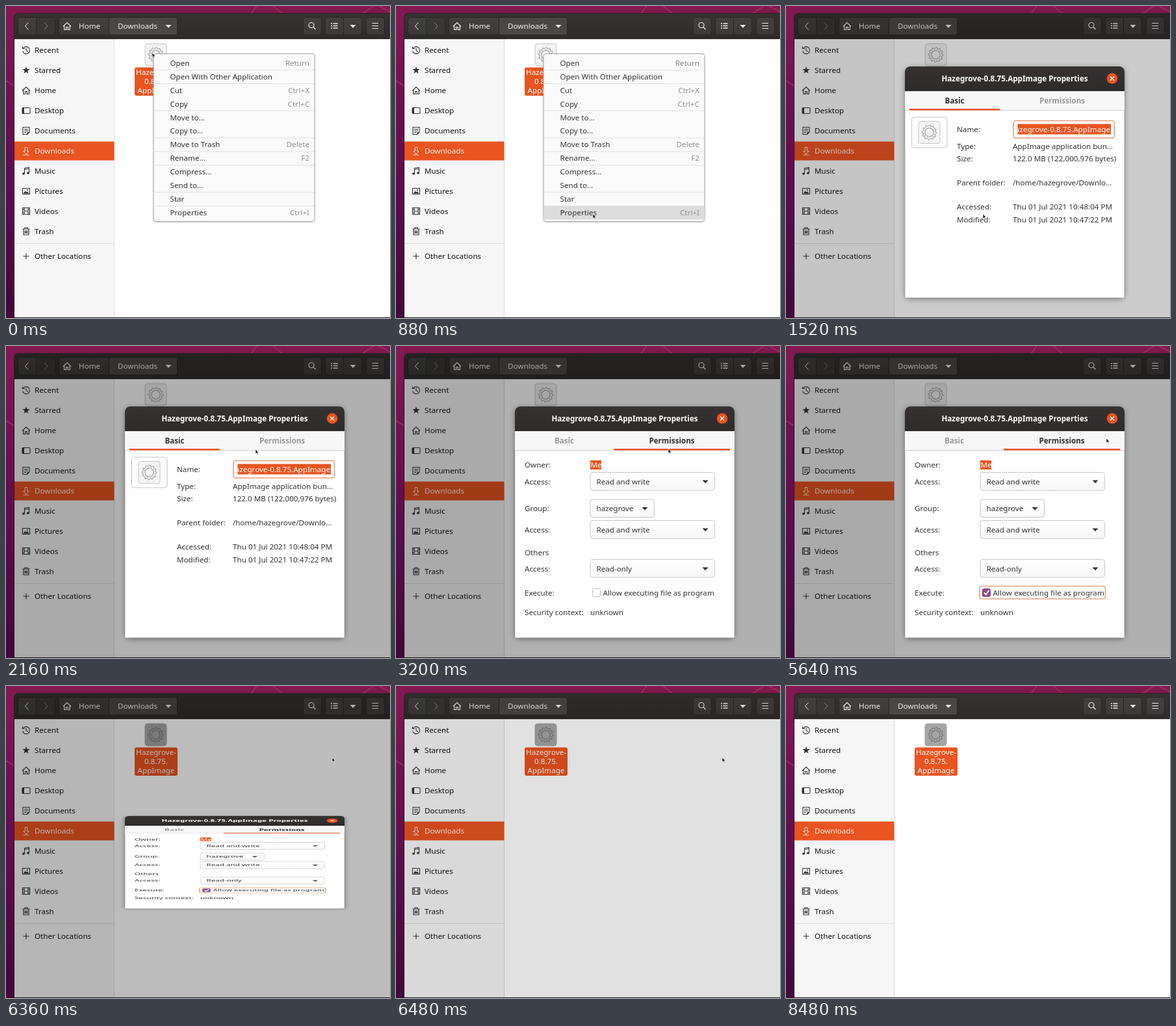
Write an HTML page that moves like this. It is 591 px wide and 480 px high and loops after 8520 ms.

```html
<!DOCTYPE html>
<html lang="en">
<head>
<meta charset="utf-8">
<title>Make a file executable</title>
<style>
  html, body { margin: 0; width: 100%; height: 100%; overflow: hidden; background: #43063a; }
  svg { display: block; width: 591px; height: 480px; }
  text { font: 11.65px "Noto Sans", "Open Sans", sans-serif; white-space: pre; }
  .b { font-weight: 700; }
</style>
</head>
<body>
<svg id="stage" viewBox="0 0 591 480"></svg>
<script>
const LOOP = 8520, STEP = 40, ORANGE = '#e95420', INK = '#333';
const FILE = 'Hazegrove-0.8.75.AppImage';

// y is the middle of the capitals
const text = (x, y, s, fill = INK, anchor = 'start', cls = '') =>
  `<text x="${x}" y="${y + 4.3}" fill="${fill}" text-anchor="${anchor}" class="${cls}">${s}</text>`;
const rect = (x, y, x2, y2, fill, r = 0, more = '') =>
  `<rect x="${x}" y="${y}" width="${x2 - x}" height="${y2 - y}" rx="${r}" fill="${fill}" ${more}/>`;
const line = (d, stroke = INK, w = 1.1, fill = 'none') =>
  `<path d="${d}" stroke="${stroke}" stroke-width="${w}" fill="${fill}"/>`;
const solid = (d, fill = INK) => `<path d="${d}" fill="${fill}"/>`;
const group = (id, body, more = '') => `<g id="${id}" ${more}>${body}</g>`;
const at = (x, y, body) => `<g transform="translate(${x} ${y})">${body}</g>`;
const arrow = (x, y, fill) => solid(`M${x - 4.5} ${y - 2}h9l-4.5 4.8z`, fill);

function ring(n, radius) {
  let d = '';
  for (let i = 0; i < n; i++) {
    const a = i * 2 * Math.PI / n, r = radius(i);
    d += `${i ? 'L' : 'M'}${(r * Math.sin(a)).toFixed(2)} ${(-r * Math.cos(a)).toFixed(2)}`;
  }
  return d + 'z';
}
const gear = ring(48, i => i % 4 < 2 ? 11.3 : 9.3);
const fileIcon = (x, y, fill, edge, ink) => at(x, y,
  rect(-16.5, -17, 16.5, 17, fill, 4, `stroke="${edge}"`) +
  line(gear, ink, 1.1) + `<circle r="6.7" fill="none" stroke="${ink}" stroke-width="1.3"/>`);

function wallpaper() {
  return rect(0, 0, 591, 480, 'url(#wall)') + rect(13, 0, 591, 12, 'url(#top)') +
    line('M377 12L386 0M411 0L426 12M548 12L566 0M574 0L591 9M0 115L13 123', '#99305f', 1.6);
}

const house = c => line('M-6 0.5L0-5.5L6 0.5M-4.3-0.5V5.5H-1.3V1.5H1.3V5.5H4.3V-0.5', c, 1.2);

function header() {
  const EDGE = '#292726', W = '#f0f0f0';
  const button = (x, x2) => rect(x, 17.5, x2, 44.5, 'url(#btn)', 4, `stroke="${EDGE}"`);
  return solid('M12 51V18a7 7 0 0 1 7-7H591V51z', '#262223') +
    solid('M13 50.5V19a7 7 0 0 1 7-7H591V50.500z', 'url(#head)') +
    button(18.5, 75.5) + rect(47, 18, 75, 44, '#393736', 3) + line('M46.5 18V44', EDGE, 1) +
    line('M34.5 25.5L29.5 31L34.5 36.5', W, 1) + line('M59 25.5L64 31L59 36.5', '#858382', 1) +
    button(81.5, 263.5) + rect(159, 18, 263, 44, '#4a4846', 3) + line('M158.5 18V44', EDGE, 1) +
    at(94, 31, house(W)) + text(112, 31, 'Home', W) + text(172, 31, 'Downloads', W) + arrow(250, 31, W) +
    button(457.5, 485.5) + `<circle cx="470" cy="29.5" r="4" fill="none" stroke="${W}" stroke-width="1.2"/>` +
    line('M473 32.5L476.500 36', W, 1.4) +
    button(491.5, 547.5) + line('M519.5 18V44', EDGE, 1) +
    line('M500 27H502M503.500 27H510.500M500 30.500H502M503.500 30.500H510.500M500 34H502M503.500 34H510.500', W, 1.5) +
    arrow(534, 31, W) +
    button(554.5, 582.5) + line('M563.500 26.500H573M563.500 30.500H573M563.500 34.500H573', W, 1.2);
}

const places = [
  ['Recent', 68, line('M-4.500-3A5.500 5.500 0 1 1-5.300 1.500M-5.500-5.500V-2.500H-2M0-3.500V0.500L3 2')],
  ['Starred', 99, solid(ring(10, i => i % 2 ? 2.4 : 6))],
  ['Home', 130, house(INK)],
  ['Desktop', 161, rect(-6, -4.5, 6, 4.5, 'none', 1.5, `stroke="${INK}" stroke-width="1.1"`) + rect(-6, -4, -3, 4, INK)],
  ['Documents', 192, line('M-5-5.500H5V2L1.500 5.500H-5zM-3-2.500H3M-3 0H3M-3 2.500H0') + solid('M5 2L1.500 5.500V2z')],
  ['Downloads', 223, line('M-1.800-5.500H1.800V0.500H4.300L0 5L-4.300 0.500H-1.800zM-4.500 6.200H4.500', '#ffe3d8', 1)],
  ['Music', 254, line('M-2.500 4V-4.500L4.500-5.500V2.500M-2.500-2.500L4.500-3.500') +
    solid('M-6 4a2 1.700 0 1 0 4 0a2 1.700 0 1 0-4 0M1 3a2 1.700 0 1 0 4 0a2 1.700 0 1 0-4 0')],
  ['Pictures', 285, line('M-5.500-4.500H5.500V4.500H-5.500z') + solid('M-4.500 3.500L-1.500-0.500L0.500 1.500L2 0L4.500 3.500z') + rect(1, -3, 3, -1, INK, 1)],
  ['Videos', 315.5, line('M-5.500-5H5.500V5H-5.500zM-3-5V5M3-5V5M-3 0H3M-5.500-2.500H-3M-5.500 2.500H-3M3-2.500H5.500M3 2.500H5.500')],
  ['Trash', 346.5, line('M-5.500-3.500H5.500M-2-3.500V-5.500H2V-3.500M-4-3.500V5.500H4V-3.500M-1.700-1V3.500M0-1V3.500M1.700-1V3.500', INK, 1.2)],
  ['Other Locations', 385, line('M-4.500 0H4.500M0-4.500V4.500')]
];

function files() {
  const lines = FILE.replace('-', '- ').replace('.App', '. App').split(' ');
  return rect(12, 50, 591, 480, '#2a1426') + rect(13, 50, 591, 480, '#fff') + rect(13, 50, 166, 480, '#f6f6f6') +
    rect(166, 50, 167, 480, '#dadada') + rect(13, 365, 166, 366, '#dcdcdc') +
    rect(13, 208.5, 166.5, 237.5, ORANGE) +
    places.map(([name, y, icon], i) => at(31, y, icon) + text(44, y, name, i === 5 ? '#fff0ea' : '#111')).join('') +
    group('plain', fileIcon(230.5, 75, '#f2f2f2', '#c6c6c6', '#a9a9a9')) +
    group('picked', fileIcon(230.5, 75, '#a5a5a5', '#a0a0a0', '#7b7b7b')) +
    rect(198, 94.5, 264, 138, ORANGE, 3) +
    lines.map((s, i) => text(231, 102 + 14 * i, s, '#fff', 'middle')).join('') +
    rect(12, 479, 591, 480, '#1c1a1a');
}

const items = [
  ['Open', 87.5, 'Return'], ['Open With Other Application', 108.5], ['Cut', 130, 'Ctrl+X'],
  ['Copy', 150.5, 'Ctrl+C'], ['Move to…', 171.5], ['Copy to…', 192], ['Move to Trash', 213, 'Delete'],
  ['Rename…', 234, 'F2'], ['Compress…', 255], ['Send to…', 275.5], ['Star', 297], ['Properties', 318, 'Ctrl+I']
];

function menu() {
  return rect(227, 73.5, 475, 331.5, '#fafafa', 4, 'stroke="#a2a2a2" filter="url(#glow)"') +
    rect(227.5, 0, 474.5, 20.5, '#dcdcdc', 0, 'id="hover"') +
    [98, 119, 160.5, 202.5, 223.5, 244.5, 286, 307].map(y => rect(228, y, 474, y + 1, '#e2e2e2')).join('') +
    items.map(([s, y, key]) => text(252.5, y, s) + (key ? text(467, y, key, '#909090', 'end') : '')).join('');
}

function basic() {
  const rows = [['Name:', 190], ['Type:', 215.5, 'AppImage application bun…'],
    ['Size:', 234.5, '122.0 MB (122,000,976 bytes)'], ['Parent folder:', 271.5, '/home/hazegrove/Downlo…'],
    ['Accessed:', 309, 'Thu 01 Jul 2021 10:48:04 PM'], ['Modified:', 328.5, 'Thu 01 Jul 2021 10:47:22 PM']];
  return rect(193.5, 171, 248, 218, '#fdfdfd', 4, 'stroke="#c4c4c4"') +
    fileIcon(220.5, 194.5, '#f4f4f4', '#c6c6c6', '#a9a9a9') +
    rows.map(([k, y, v = '']) => text(263, y, k) + text(349, y, v)).join('') +
    rect(350, 176.5, 505.5, 203, '#fff', 4, 'stroke="#eb9a78" stroke-width="1.6"') +
    rect(356.5, 181.5, 500, 197.5, ORANGE) +
    `<g clip-path="url(#entry)">${text(499, 189.5, FILE, '#fff', 'end')}</g>`;
}

function permissions() {
  const labels = [['Owner:', 183], ['Access:', 208.5], ['Group:', 250], ['Access:', 282.5], ['Others', 317.5],
    ['Access:', 342.5], ['Execute:', 379.5], ['Security context:', 409.5]];
  const combo = (y, s, x2 = 490.5) => rect(299, y - 14, x2, y + 13.5, 'url(#combo)', 4, 'stroke="#c6c6c6"') +
    text(308.5, y, s) + arrow(x2 - 14.5, y, INK);
  const box = (id, fill, edge, more = '') =>
    group(id, rect(302.5, 373.5, 314.5, 385.5, fill, 2, `stroke="${edge}"`) + more);
  return labels.map(([s, y]) => text(198, y, s)).join('') +
    rect(299, 176, 316, 190, ORANGE) + text(299.5, 183, 'Me', '#fff') +
    combo(208.5, 'Read and write') + combo(250, 'hazegrove', 397.5) +
    combo(282.5, 'Read and write') + combo(342.5, 'Read-only') +
    rect(298, 369.5, 491.5, 389, 'none', 3, 'id="focus" stroke="#e6a682" stroke-width="1.6"') +
    box('empty', '#fff', '#bdbdbd') + box('pressed', '#bcbcbc', '#b0b0b0') +
    box('checked', '#924d8b', '#7e3f78', line('M305 379.500L307.700 382.500L312.500 376', '#fff', 1.9)) +
    text(318.5, 379.5, 'Allow executing file as program') + text(299, 409.5, 'unknown');
}

function dialog() {
  const tabs = (on, off, x, x2, offX) => rect(x, 158, x2, 160.5, ORANGE) +
    text((x + x2) / 2, 146, on, '#2f2f2f', 'middle', 'b') + text(offX, 146, off, '#9a9a9a', 'middle', 'b');
  return rect(183, 93, 521, 449, '#fff', 8, 'filter="url(#shade)"') +
    rect(183, 120, 521, 449, '#fff', 0, 'stroke="#8a8a8a" stroke-width=".6"') +
    solid('M183 131V101a8 8 0 0 1 8-8H513a8 8 0 0 1 8 8V131z', 'url(#head)') +
    text(352, 111.5, FILE + ' Properties', '#fff', 'middle', 'b') +
    `<circle cx="502" cy="111.500" r="8.300" fill="${ORANGE}"/>` + line('M499 108.500L505 114.500M505 108.500L499 114.500', '#fff', 1.3) +
    rect(183, 131, 521, 160, '#f7f7f7') + rect(183, 160, 521, 161, '#d2d2d2') +
    group('basic', tabs('Basic', 'Permissions', 190, 329, 425) + basic()) +
    group('perms', tabs('Permissions', 'Basic', 335, 514, 259) + permissions());
}

const gradient = (id, ...stops) => `<linearGradient id="${id}" x2="0" y2="1">` +
  stops.map((c, i) => `<stop offset="${i / (stops.length - 1)}" stop-color="${c}"/>`).join('') + '</linearGradient>';
const shadow = (id, dy, blur, alpha) => `<filter id="${id}" x="-20%" y="-20%" width="140%" height="140%">
  <feDropShadow dx="0" dy="${dy}" stdDeviation="${blur}" flood-opacity="${alpha}"/></filter>`;

stage.innerHTML = '<defs>' +
  gradient('wall', '#831a50', '#6b1052', '#580b4b', '#43063a') + gradient('top', '#851a52', '#7a1748') +
  gradient('head', '#353231', '#2e2c2b') + gradient('btn', '#434140', '#3c3a39') + gradient('combo', '#fff', '#f8f8f8') +
  shadow('shade', 2, 4, 0.4) + shadow('glow', 1, 1, 0.18) +
  '<clipPath id="entry"><rect x="356.5" y="178" width="144" height="24"/></clipPath></defs>' +
  wallpaper() + files() + header() +
  group('dim', solid('M13 480V19a7 7 0 0 1 7-7H591V480z', '#000')) +
  group('menu', menu()) + group('dialog', dialog()) +
  group('cursor', line('M0 0V7L1.700 5.500L2.900 8L4 7.500L2.900 5.100H5z', '#fff', 0.7, '#111'));

const el = id => document.getElementById(id);
const show = (id, on) => el(id).style.display = on ? '' : 'none';
const ramp = (t, from, to) => Math.min(1, Math.max(0, (t - from) / (to - from)));
const ease = p => p * p * (3 - 2 * p);

// time, x, y of the pointer tip
const path = [[320, 225, 72], [800, 303, 320], [1640, 303, 320], [2160, 384, 159], [2400, 424, 146],
  [3080, 424, 146], [3960, 326, 386], [5080, 326, 386], [5640, 493, 142], [5800, 502, 110]];

function pointer(t) {
  let [, x, y] = path[0];
  for (let i = 1; i < path.length; i++) {
    const p = ease(ramp(t, path[i - 1][0], path[i][0]));
    x += (path[i][1] - path[i - 1][1]) * p;
    y += (path[i][2] - path[i - 1][2]) * p;
  }
  return [x, y];
}

function draw(t) {
  const [x, y] = pointer(t);
  el('cursor').setAttribute('transform', `translate(${x} ${y})`);
  show('cursor', t < 8400);

  const fade = 1 - ramp(t, 1120, 1240);
  show('menu', fade > 0);
  el('menu').style.opacity = fade;
  const row = items.find(i => Math.abs(i[1] - y) <= 10.6);
  show('hover', row && x > 227);
  if (row) el('hover').setAttribute('y', row[1] - 10);

  const size = ramp(t, 1360, 1480) * (1 - ramp(t, 6300, 6400));
  show('dialog', size > 0);
  el('dialog').setAttribute('transform', `translate(0 ${271 * (1 - size)}) scale(1 ${size})`);
  el('dim').style.opacity = 0.31 * ramp(t, 1360, 1610) * (1 - ramp(t, 6320, 6580));

  show('basic', t < 2640);
  show('perms', t >= 2640);
  show('focus', t >= 4160);
  show('empty', t < 4160);
  show('pressed', t >= 4160 && t < 4240);
  show('checked', t >= 4240);
  show('plain', t < 6300);
  show('picked', t >= 6300);
}

function tick() {
  const t = performance.now() % LOOP;
  draw(t - t % STEP);
  requestAnimationFrame(tick);
}
tick();
</script>
</body>
</html>
```
